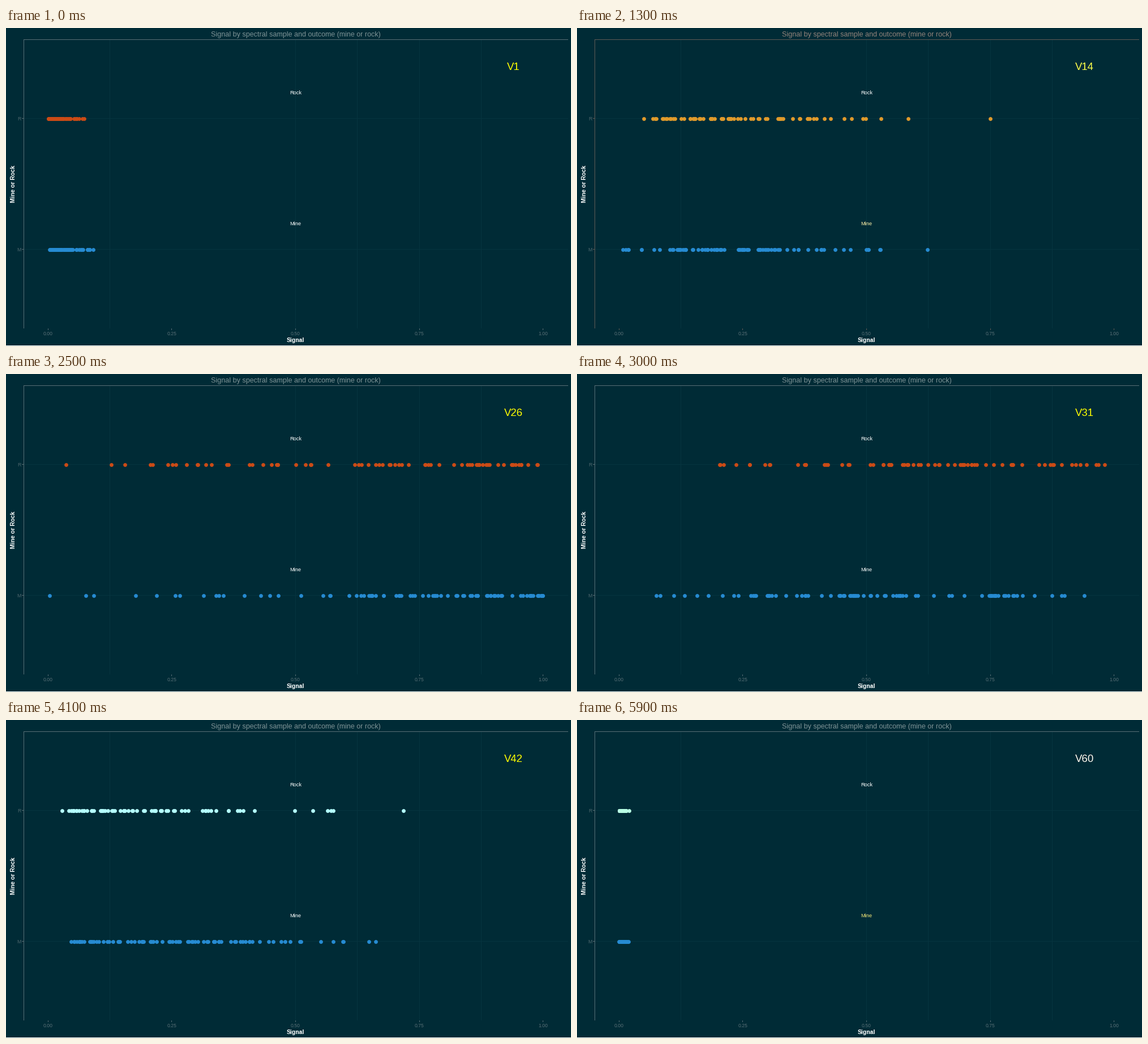
These frames come from a looping animation (998 by 561 pixels, 6 s). A matplotlib script:

```python
import numpy as np
import matplotlib.pyplot as plt
from matplotlib.animation import FuncAnimation
from matplotlib.patches import Rectangle

W, H, DPI = 998, 561, 64
PT = 72 / DPI  # points per pixel
BANDS = 60
ROCK_Y, MINE_Y = 159.5, 390.5

BG, GRID, BLUE = "#002b36", "#06343f", "#268bd2"

# rock dots, band label, "Mine" label, title, axis lines
LOOKS = {
    "red": ("#cb4b16", "#ffff00", "#ffffff", "#7f9295", "#586e75"),
    "amber": ("#e09a2b", "#ffff4a", "#fff0a8", "#94827a", "#5f5a55"),
    "mint": ("#b8ffe4", "#fff8ee", "#f5e878", "#7f9295", "#586e75"),
    "cyan": ("#b4ffff", "#ffff00", "#ffffff", "#7f9295", "#586e75"),
}
LOOK_STARTS = [(1, "red"), (11, "amber"), (18, "red"),
               (34, "mint"), (42, "cyan"), (54, "mint")]

# The mean signal rises to a peak, then fades out across the bands
TURNS = [1, 5, 14, 22, 26, 35, 43, 50, 60]
ROCK_MEAN = [.022, .06, .26, .55, .65, .45, .22, .018, .007]
MINE_MEAN = [.032, .085, .29, .65, .70, .34, .28, .022, .007]
SHAPE = 1.8

plt.rcParams["font.family"] = "Liberation Sans"
fig = plt.figure(figsize=(W / DPI, H / DPI), dpi=DPI, facecolor=BG)
ax = fig.add_axes([0, 0, 1, 1])
ax.set_xlim(0, W)
ax.set_ylim(H, 0)
ax.axis("off")


def px(value):
    return 74.3 + 874.4 * value


def box(x, y, w, h, color):
    return ax.add_patch(Rectangle((x, y), w, h, fc=color, lw=0, antialiased=False))


def label(x, y, s, size, color, **kw):
    return ax.text(x, y, s, fontsize=size * PT, color=color,
                   ha="center", va="baseline", **kw)


def dots(color):
    return ax.plot([], [], "o", ms=6.8 * PT, mew=0, color=color)[0]


def signal(means, band, count, seed):
    """Skewed random sample around the mean signal of a band."""
    mean = np.interp(band, TURNS, means)
    rng = np.random.default_rng([seed, band])
    return rng.beta(SHAPE, SHAPE * (1 - mean) / mean, count)


for v in (.125, .5, .625, .75, .875):
    box(int(px(v)), 21, 1, 509, GRID)
for y in (ROCK_Y, MINE_Y):
    box(32, int(y), 961, 1, GRID)

axis_parts = [box(31, 20, 962, 1, BG), box(31, 20, 1, 510, BG)]
for y, name in ((ROCK_Y, "R"), (MINE_Y, "M")):
    axis_parts.append(box(28, int(y), 3, 1, BG))
    label(23, y + 3.3, name, 8.7, "#4f666d")
for v in np.linspace(0, 1, 5):
    axis_parts.append(box(int(px(v)), 530, 1, 3, BG))
    label(px(v), 541.8, f"{v:.2f}", 8.6, "#586e75")
box(0, 560, W, 1, "white")

title = label(511.5, 15, "Signal by spectral sample and outcome (mine or rock)", 12.55, BG)
label(511.5, 554.4, "Signal", 10.4, "white", weight="bold")
label(15.6, 275, "Mine or Rock", 10.5, "white", weight="bold",
      rotation=90, rotation_mode="anchor")
label(511.5, 117.4, "Rock", 9.3, "white")
mine_label = label(511, 348.4, "Mine", 9.3, "white")
band_label = label(896.7, 74.4, "", 18.6, "yellow")
rock_dots = dots("white")
mine_dots = dots(BLUE)


def draw(i):
    band = i + 1
    look = [name for start, name in LOOK_STARTS if start <= band][-1]
    rock, tag, mine, head, axis = LOOKS[look]
    for line, y, means, count, seed in ((rock_dots, ROCK_Y, ROCK_MEAN, 70, 3),
                                        (mine_dots, MINE_Y, MINE_MEAN, 80, 8)):
        line.set_data(px(signal(means, band, count, seed)), np.full(count, y))
    rock_dots.set_color(rock)
    band_label.set_text(f"V{band}")
    band_label.set_color(tag)
    mine_label.set_color(mine)
    title.set_color(head)
    for part in axis_parts:
        part.set_facecolor(axis)
    return []


anim = FuncAnimation(fig, draw, frames=BANDS, interval=100,
                     init_func=lambda: draw(0), repeat=True, repeat_delay=0)
plt.show()
```
